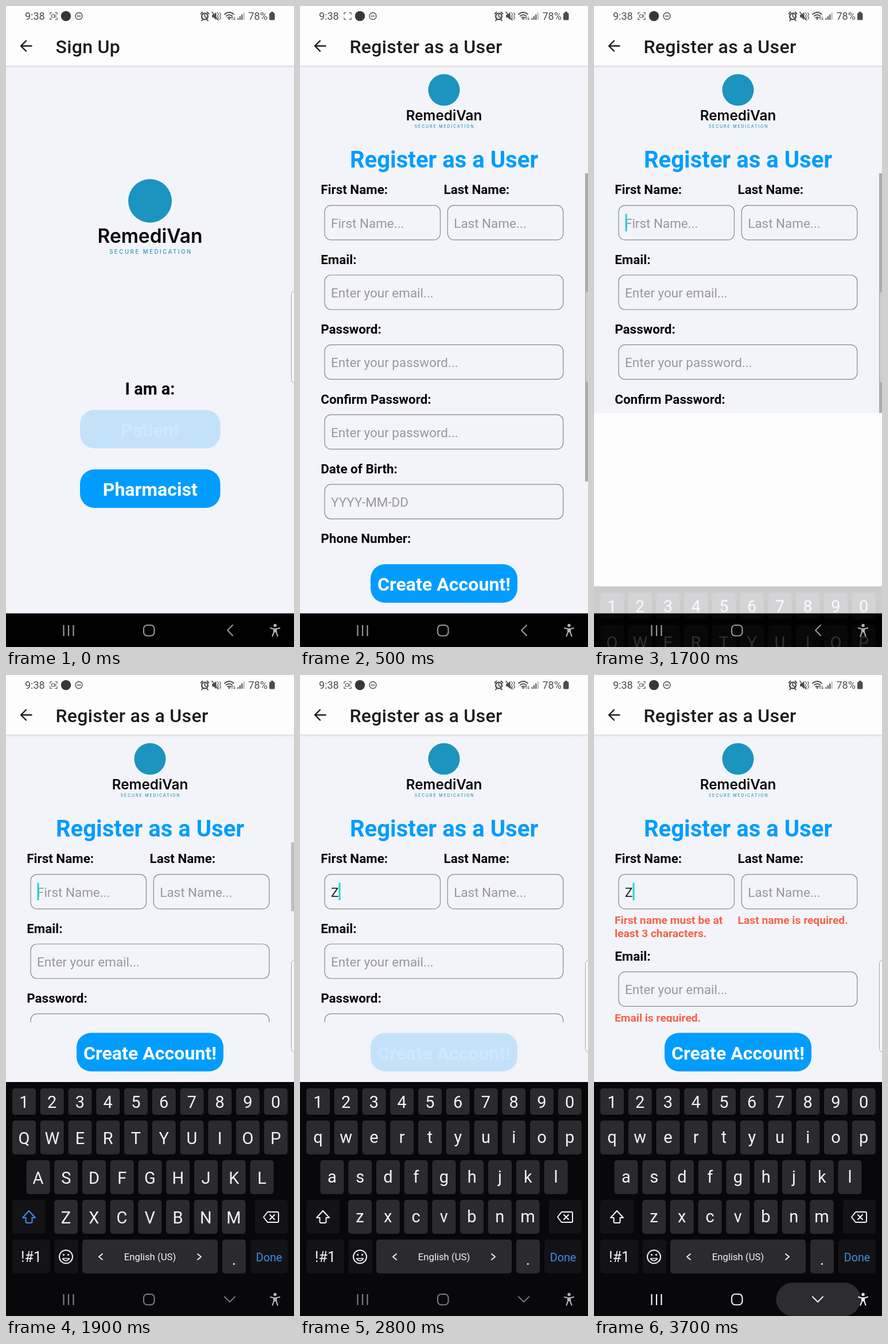
These frames come from a looping animation (502x1115 px, 3.8 s). An HTML page with a canvas:

```html
<!DOCTYPE html>
<html lang="en">
<head>
<meta charset="utf-8">
<title>Sign up flow</title>
<style>
  html, body { margin: 0; width: 100%; height: 100%; overflow: hidden; background: #fdfdfe; }
  canvas { display: block; width: 100%; height: 100%; }
</style>
</head>
<body>
<canvas id="stage" width="502" height="1115"></canvas>
<script>
const W = 502, H = 1115, LOOP = 3800, STEP = 100;
const BG = '#f3f4f9', WHITE = '#fefdfe', BLUE = '#009dff', ERROR = '#f5624a';
const NAV_TOP = 1056.5, KEYS_TOP = 708;
const SP = 1.604; // pixels per scaled text unit

const canvas = document.getElementById('stage');
const buffer = document.createElement('canvas');
buffer.width = W;
buffer.height = H;
let g = canvas.getContext('2d');

const clamp = v => Math.max(0, Math.min(1, v));
const within = (t, a, b) => t >= a && t < b;

function text(str, x, y, size, color, weight = 400, align = 'left', family = 'Roboto') {
  g.font = `${weight} ${size}px ${family}, sans-serif`;
  g.textAlign = align;
  g.fillStyle = color;
  g.fillText(str, x, y);
}

function spaced(gap, draw) {
  g.letterSpacing = gap + 'px';
  draw();
  g.letterSpacing = '0px';
}

function rect(x, y, w, h, color) {
  g.fillStyle = color;
  g.fillRect(x, y, w, h);
}

function box(x, y, w, h, r, fill, stroke, width = 1.2) {
  g.beginPath();
  g.roundRect(x, y, w, h, r);
  if (fill) { g.fillStyle = fill; g.fill(); }
  if (stroke) { g.strokeStyle = stroke; g.lineWidth = width; g.stroke(); }
}

function disc(x, y, r, fill, stroke, width) {
  box(x - r, y - r, 2 * r, 2 * r, r, fill, stroke, width);
}

// Strokes an SVG path whose origin is moved to x, y
function path(d, x, y, color, width = 2, fill) {
  const p = new Path2D(d);
  g.save();
  g.translate(x, y);
  g.lineCap = g.lineJoin = 'round';
  if (fill) { g.fillStyle = color; g.fill(p); }
  g.strokeStyle = color;
  g.lineWidth = width;
  g.stroke(p);
  g.restore();
}

function layer(alpha, dx, dy, draw) {
  if (alpha <= 0) return;
  const main = g;
  g = buffer.getContext('2d');
  g.clearRect(0, 0, W, H);
  draw();
  g = main;
  g.globalAlpha = alpha;
  g.drawImage(buffer, dx, dy);
  g.globalAlpha = 1;
}

function button(label, x, y, w, alpha = 1) {
  g.globalAlpha = alpha;
  box(x, y, w, 67, 25, BLUE);
  text(label, x + w / 2, y + 46, 20 * SP, '#fff', 700, 'center');
  g.globalAlpha = 1;
}

function logo(y, scale) {
  g.save();
  g.translate(251, y);
  g.scale(scale, scale);
  disc(0, 0, 38, '#1b94bf');
  text('RemediVan', 0, 73, 33.5, '#060608', 600, 'center', 'Inter');
  spaced(2.5, () => text('SECURE MEDICATION', 1.5, 91.5, 9.7, '#2a97bf', 500, 'center', 'Inter'));
  g.restore();
}

function header(title) {
  rect(0, 0, W, 104, WHITE);
  const shade = g.createLinearGradient(0, 103, 0, 108);
  shade.addColorStop(0, '#d9d9de');
  shade.addColorStop(1, BG);
  rect(0, 103.5, W, 4.5, shade);
  path('M18.5 0H0M9 -9L0 0L9 9', 26, 69.5, '#1c1c1f', 2.4);
  spaced(0.3, () => text(title, 86.5, 82, 20 * SP, '#1c1c1f', 500));
}

function statusBar(recording) {
  const c = '#4c4c4f';
  text('9:38', 33, 24, 18, c);
  path('M-6 -3V-6H-3M3 -6H6V-3M6 3V6H3M-3 6H-6V3', 83, 17.5, c, 1.2);
  if (recording) {
    box(79.5, 15, 5, 5, 1, null, c, 1.1);
    path('M0 1L2 0V4L0 3Z', 85, 15.5, c, 0.8);
  }
  disc(104.5, 17.5, 8.7, '#38383b');
  disc(127, 17.5, 6, null, c, 1.4);
  path('M-3 0H3', 127, 17.5, c, 1.4);

  disc(346.5, 18, 5.4, null, c, 2.4);
  path('M0 -3V0.5L2.5 2M-7 -4.5L-4 -7.5M7 -4.5L4 -7.5M-4 6L-5.5 7.5M4 6L5.5 7.5', 346.5, 18, c, 1.9);
  path('M-5 -2H-3L1 -6V6L-3 2H-5Z', 365, 17.5, c, 1, true);
  path('M-6 -7L5 7', 365, 17.5, c, 1.6);
  path('M0 -6L2 -3L0 0L2 3L0 6M4 -6L6 -3L4 0L6 3L4 6', 368.5, 17.5, c, 1.2);
  path('M-8 -3Q0 -10 8 -3M-5.3 0Q0 -4.6 5.3 0M-2.6 3Q0 1 2.6 3', 389, 17.5, c, 1.8);
  disc(389, 22.5, 1.5, c);
  path('M0 0V5M-1.5 1.5L0 0L1.5 1.5M4 5V0M2.5 3.5L4 5L5.5 3.5', 394, 19, c, 1);
  for (let i = 0; i < 4; i++) {
    rect(403.5 + i * 3.4, 21 - i * 3.2, 2, 3 + i * 3.2, i < 3 ? c : '#b5b5b8');
  }
  text('78%', 422.5, 24, 18, c);
  box(459, 12, 9.5, 12.5, 1.8, c);
  rect(461.5, 10, 4.5, 2.5, c);
}

function edgeHandle() {
  box(497.5, 496.5, 20, 159, 5, 'rgba(255,255,255,.4)', '#a4a4a9', 1);
}

function roleScreen(alpha) {
  rect(0, 0, W, H, BG);
  header('Sign Up');
  logo(339, 1);
  text('I am a:', 251, 676, 18 * SP, '#060608', 700, 'center');
  button('Patient', 129, 702.5, 244.5, alpha);
  button('Pharmacist', 129, 806, 244.5);
}

function label(str, x, y) { text(str, x, y, 14 * SP, '#060608', 700); }
function error(str, x, y) { text(str, x, y, 12 * SP, ERROR, 700); }
function field(hint, x, y, w, value) {
  box(x, y, w, 60, 11, null, '#88888c', 1.2);
  text(value || hint, x + 11, y + 39, 14 * SP, value ? '#1d1d20' : '#97979c');
}

function formScreen(s) {
  rect(0, 0, W, H, BG);
  header('Register as a User');
  g.save();
  g.beginPath();
  g.rect(0, 108, W, s.bottom - 104 - 108);
  g.clip();

  logo(146, 0.724);
  text('Register as a User', 251, 280.5, 25 * SP, BLUE, 700, 'center');
  label('First Name:', 36.2, 327.3);
  label('Last Name:', 250.5, 327.3);
  field('First Name...', 43, 346.8, 201.5, s.value);
  field('Last Name...', 257.3, 346.8, 201.5);
  if (s.cursor) rect(s.value ? 67.5 : 54.5, 361.5, 3, 30.5, '#1fd6d6');

  if (s.errors) {
    error('First name must be at', 36, 433);
    error('least 3 characters.', 36, 455.5);
    error('Last name is required.', 250.5, 433);
    error('Email is required.', 36, 603.3);
  }
  const rows = [
    ['Email:', 'Enter your email...'],
    ['Password:', 'Enter your password...'],
    ['Confirm Password:', 'Enter your password...'],
    ['Date of Birth:', 'YYYY-MM-DD'],
    ['Phone Number:', '']
  ];
  rows.forEach(([name, hint], i) => {
    const y = 448.8 + i * 121.4 + (s.errors ? 48.4 + i * 26 : 0);
    label(name, 36.2, y);
    field(hint, 43, y + 19.2, 415.8);
  });
  g.restore();

  button('Create Account!', 123, s.bottom - 85.5, 256, s.press);
  if (s.bar > 0) rect(497, 291, 5, s.barLength, `rgba(0,0,0,${0.3 * s.bar})`);
}

function passPopup() {
  g.save();
  g.shadowColor = 'rgba(0,0,0,.35)';
  g.shadowBlur = 6;
  g.shadowOffsetY = 2;
  box(43, 407.5, 294.5, 92.5, 10, '#fdfdfe');
  g.restore();
  text('TORVELA', 129.5, 439, 17, '#55555a', 800);
  text('Keys', 251, 439, 17, '#55555a', 500, 'right');
  text('View accounts', 190, 477.5, 20.3, '#48484c', 400, 'center');
  rect(124, 480.5, 132, 1.3, '#48484c');
}

function keyboard(upper, pressed) {
  const KEY = '#2b2b2e', DARK = '#131316', INK = '#f4f4f6', PITCH = 48.75;
  const key = (x, y, w, h, color = KEY) => box(x, y, w, h, 5, color);
  rect(0, KEYS_TOP, W, H - KEYS_TOP, '#08080a');

  const rows = [
    ['1234567890', 11, 719, 46],
    ['qwertyuiop', 11, 775, 59],
    ['asdfghjkl', 35.5, 844, 59],
    ['zxcvbnm', 84, 913, 59]
  ];
  rows.forEach(([chars, left, y, h], row) => {
    [...chars].forEach((ch, i) => {
      const x = left + i * PITCH;
      key(x, y, 41, h, ch === pressed ? '#505054' : KEY);
      const big = upper || row === 0;
      text(upper ? ch.toUpperCase() : ch, x + 20.5, y + h / 2 + (big ? 11 : 9.5), 29, INK, 400, 'center');
    });
  });

  key(11, 913, 58, 59, DARK);
  path('M0 -11L11 1H5.5V8Q5.5 10 3.5 10H-3.5Q-5.5 10 -5.5 8V1H-11Z', 40, 943, upper ? '#3f8cf0' : INK, 2);
  key(434, 913, 57, 59, DARK);
  path('M-13 0L-6 -9H11Q13 -9 13 -7V7Q13 9 11 9H-6ZM-2 -4L6 4M6 -4L-2 4', 462, 943, INK, 2);

  key(11, 982, 66, 59, DARK);
  text('!#1', 44, 1021, 25, INK, 400, 'center');
  key(84.5, 982, 41.5, 59, DARK);
  disc(104.5, 1012, 11.5, null, INK, 2);
  disc(100.5, 1008.5, 1.6, INK);
  disc(108.5, 1008.5, 1.6, INK);
  path('M-6 3Q0 11 6 3Z', 104.5, 1012, INK, 1.7);
  key(133, 982, 236, 59);
  path('M3 -5L-3 0L3 5', 165, 1012, INK, 1.8);
  path('M-3 -5L3 0L-3 5', 337, 1012, INK, 1.8);
  text('English (US)', 251, 1018, 16.7, INK, 400, 'center');
  key(377, 982, 41, 59);
  text('.', 397.5, 1026, 28, INK, 400, 'center');
  key(426, 982, 65, 59, DARK);
  text('Done', 458.5, 1019.5, 19.8, '#3f8ce8', 400, 'center');
}

function navIcons(open, glow) {
  const c = glow ? '#f2f2f4' : open ? '#7c7c7f' : '#98989b';
  if (glow) box(317.5, 1057, 147.5, 58, 29, `rgba(255,255,255,${0.15 * glow})`);
  for (const x of [100.5, 109, 117.5]) rect(x - 1.1, 1077, 2.2, 19, c);
  box(240, 1077, 18.5, 18.5, 6, null, c, 2.1);
  if (open) path('M-9 -4.5L0 4.5L9 -4.5', 390, 1086, c, 2);
  else path('M4.5 -9L-4.5 0L4.5 9', 390.5, 1086, c, 2.1);

  const p = glow ? '#f2f2f4' : '#b4b4b7';
  disc(469, 1077.5, 2.7, p);
  path('M-8 -4L-2.5 -2.5H2.5L8 -4M-2 -2V3L-4.5 10M2 -2V3L4.5 10', 469, 1086, p, 2.2);
  rect(466.5, 1083.5, 5, 6, p);
}

function pressAlpha(t) {
  if (t < 2700 || t >= 3200) return 1;
  if (t < 2800) return 0.5;
  return t < 3100 ? 0.2 : 0.55;
}

function formState(t) {
  const resized = t >= 1800;
  return {
    bottom: resized ? KEYS_TOP : NAV_TOP,
    value: t >= 2600 ? 'Z' : '',
    cursor: t >= 1600 && Math.floor((t - 1600) / 500) % 2 === 0,
    errors: t >= 3200,
    press: pressAlpha(t),
    bar: t < 700 ? 1 : t < 1700 ? 0 : clamp((2200 - t) / 400),
    barLength: resized ? 120 : 536
  };
}

function draw(t) {
  g.clearRect(0, 0, W, H);
  const enter = clamp((t - 100) / 300);
  const form = () => formScreen(formState(t));
  if (enter < 1) {
    roleScreen(clamp(0.2 + t / 250));
    layer(enter, 50 * (1 - enter), 0, form);
  } else {
    form();
  }

  if (t >= 1700) rect(0, KEYS_TOP, W, H - KEYS_TOP, '#fefdfe');
  rect(0, NAV_TOP, W, H - NAV_TOP, '#000');
  if (within(t, 3300, 3500)) passPopup();

  const p = clamp((t - 1600) / 300);
  const rise = p * p * (3 - 2 * p);
  layer(rise ** 1.2, 0, (H - KEYS_TOP) * (1 - rise), () => {
    keyboard(t < 2600, within(t, 2400, 2600) ? 'z' : '');
  });

  const blink = within(t, 400, 700) || within(t, 1500, 1600) ||
                within(t, 2400, 2600) || within(t, 3300, 3500);
  statusBar(!blink);
  edgeHandle();
  navIcons(t >= 1800, t >= 3700 ? 1 : t >= 3600 ? 0.5 : 0);
}

const start = performance.now();
function tick() {
  const t = (performance.now() - start) % LOOP;
  draw(Math.floor(t / STEP) * STEP);
  requestAnimationFrame(tick);
}
tick();
</script>
</body>
</html>
```
